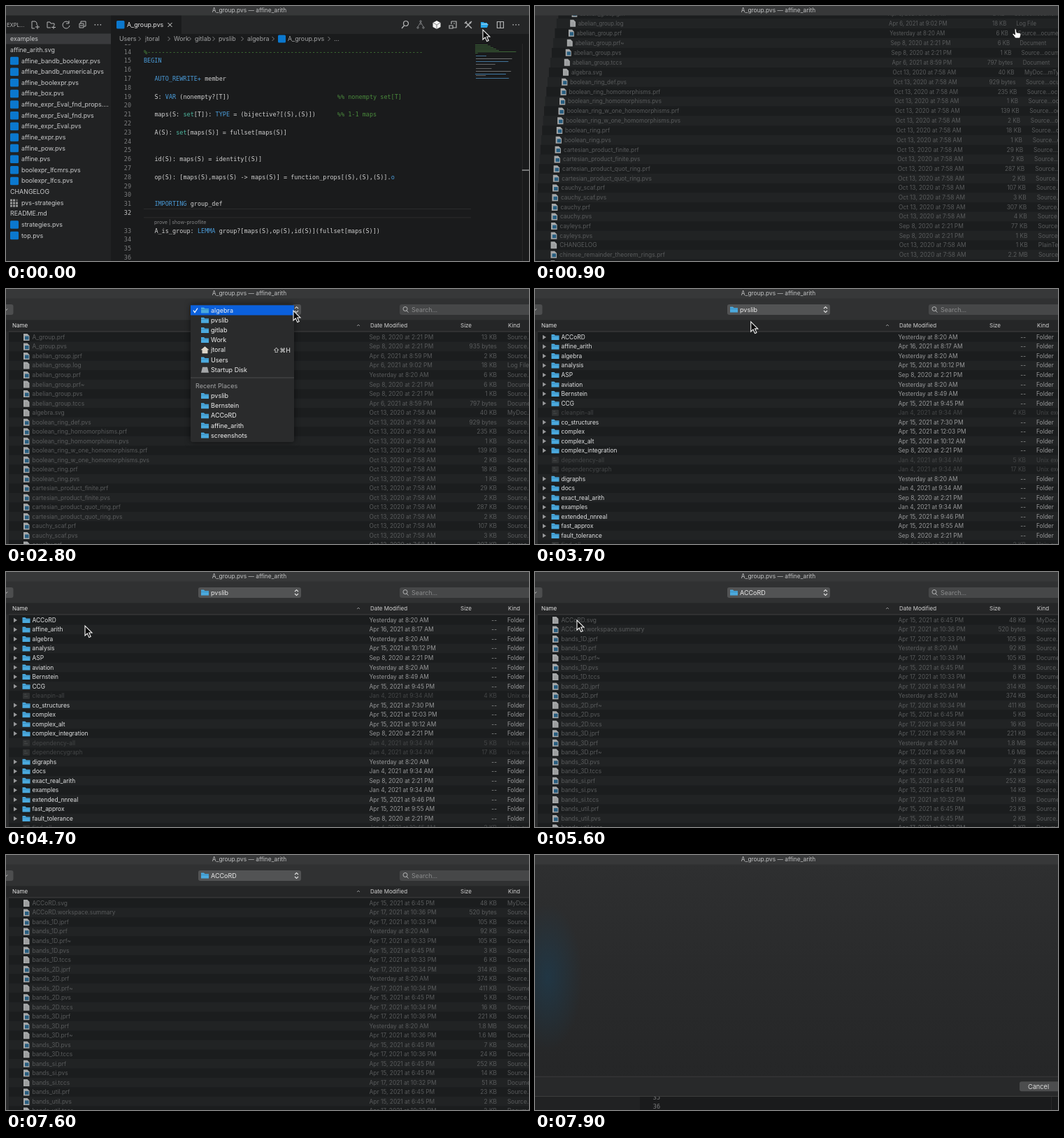
These frames come from a looping animation (748x365 px, 8000 ms). An HTML page with a canvas:

```html
<!DOCTYPE html>
<html>
<head>
<meta charset="utf-8">
<style>
html, body { margin: 0; width: 100%; height: 100%; overflow: hidden; background: #1a1b1c; }
canvas { display: block; }
</style>
</head>
<body>
<canvas id="stage" width="748" height="365"></canvas>
<script>
const LOOP = 8000, W = 748, H = 365, MID = 348, SHEET_END = 520;
const UI = 'Inter, "Open Sans", sans-serif', MONO = '"DejaVu Sans Mono", monospace';
const ctx = document.getElementById('stage').getContext('2d');

const clamp = (v, a = 0, b = 1) => Math.min(b, Math.max(a, v));
const smooth = p => p * p * (3 - 2 * p);

function rect(x, y, w, h, color, r = 0) {
  ctx.fillStyle = color;
  ctx.beginPath();
  ctx.roundRect(x, y, w, h, r);
  ctx.fill();
}
function text(s, x, y, color = '#ccc', size = 8.9, align = 'left', font = UI) {
  ctx.font = size + 'px ' + font;
  ctx.textAlign = align;
  ctx.textBaseline = 'middle';
  ctx.fillStyle = color;
  ctx.fillText(s, x, y + .4);
}
function shape(d, x, y, stroke, fill, width = 1) {
  const path = new Path2D(d);
  ctx.save();
  ctx.translate(x, y);
  if (fill) { ctx.fillStyle = fill; ctx.fill(path); }
  if (stroke) { ctx.strokeStyle = stroke; ctx.lineWidth = width; ctx.stroke(path); }
  ctx.restore();
}
function folder(x, y, color = '#4ba9dd') {
  shape('M0-4h4l1.5 1.5H11V4H0z', x, y, null, color);
  rect(x, y - 1.5, 11, .7, '#2f82b5');
}

// ---------- editor ----------
const tree = `examples
affine_arith.svg
affine_bandb_boolexpr.pvs
affine_bandb_numerical.pvs
affine_boolexpr.pvs
affine_box.pvs
affine_expr_Eval_fnd_props....
affine_expr_Eval_fnd.pvs
affine_expr_Eval.pvs
affine_expr.pvs
affine_pow.pvs
affine.pvs
boolexpr_lfcmrs.pvs
boolexpr_lfcs.pvs
CHANGELOG
pvs-strategies
README.md
strategies.pvs
top.pvs`.split('\n');

const code = {
  14: '%' + '-'.repeat(77),
  15: 'BEGIN',
  17: '   AUTO_REWRITE+ member',
  19: '   S: VAR (nonempty?[T])' + ' '.repeat(30) + '%% nonempty set[T]',
  21: '   maps(S: set[T]): TYPE = (bijective?[(S),(S)])' + ' '.repeat(6) + '%% 1-1 maps',
  23: '   A(S): set[maps(S)] = fullset[maps(S)]',
  26: '   id(S): maps(S) = identity[(S)]',
  28: '   op(S): [maps(S),maps(S) -> maps(S)] = function_props[(S),(S),(S)].o',
  31: '   IMPORTING group_def',
  33: '   A_is_group: LEMMA group?[maps(S),op(S),id(S)](fullset[maps(S)])'
};
const tokens = /%.*|\b(?:BEGIN|AUTO_REWRITE\+|VAR|TYPE|IMPORTING|LEMMA|set|o\b(?!p))|[^%\s]+?(?=\b(?:set\b|VAR|TYPE|o$)|\s|%|$)/g;
function tokenColor(s) {
  if (s[0] === '%') return '#4a8a3c';
  if (s === 'set') return '#4fb8a0';
  return /^([A-Z_]{3,}\+?|o)$/.test(s) ? '#4a9bd8' : '#cfcfcf';
}

function editor() {
  const grey = '#b4b5b6';
  rect(0, 0, W, H, '#1a1b1c');
  rect(0, 13, 150, H, '#212223');
  rect(150, 13, W, 27, '#252627');
  rect(150, 13, 101, 27, '#1a1b1c');

  // code
  for (let n = 13; n <= 36; n++) {
    const y = 66 + (n - (n > 32 ? 13 : 14)) * 12.8;
    if (n === 32) {
      rect(197, y - 6.5, 468, .8, '#303132');
      rect(197, y + 6, 468, .8, '#303132');
    }
    text(n, 179, y, n === 32 ? '#c6c6c6' : '#7c7d7e', 8.5, 'right', MONO);
    for (const m of (code[n] || '').matchAll(tokens))
      text(m[0], 197 + m.index * 5.127, y, tokenColor(m[0]), 8.515, 'left', MONO);
  }
  text('prove | show-prooflite', 212, 309.5, '#858687', 7.1);
  rect(150, 40, W, 14.5, '#1a1b1c');

  // minimap
  for (let n = 0; n < 26; n++) {
    const line = code[n + 9];
    if (line || n < 7) {
      const len = line ? line.trim().length * .75 : 18 + n * 37 % 33;
      rect(n < 7 ? 671 : 672, 55 + n * 2, Math.min(len, 62), .9,
        n < 7 ? '#3d6638' : n % 4 ? '#6d6e6f' : '#42749a');
    }
  }
  rect(671, 97, 44, 1, '#3d78a5');
  rect(738, 54, 1, H, '#29292a');
  rect(738, 234, 10, 2, '#737475');

  // sidebar
  text('EXPL...', 1, 27, '#b5b5b5', 7.6);
  shape('M-4-5h5l2 2v3M-4-5V5h4M4 0v6M1 3h6', 41, 27, grey);
  shape('M-5-4h4l1 2h5v3M-5-4V4h5M4 1v5M1 3.5h6', 64, 27, grey);
  shape('M4-3A5 5 0 1 0 5 1M4-6v4H0', 86, 27, grey);
  shape('M-4-2h6v6h-6zM-2-2v-3h7v7H2M-3 1h4', 109, 27, grey);
  for (const dx of [-4, 0, 4]) rect(130.5 + dx, 26, 1.7, 1.7, grey, 1);
  rect(0, 39.5, 150, 15, '#393a3c');
  tree.forEach((name, i) => {
    const y = 47.3 + i * 15.62, icon = /pvs|\.\.\.\.$/.test(name);
    if (name === 'pvs-strategies') {
      for (let k = 0; k < 9; k++) rect(6 + k % 3 * 4, y - 5 + (k / 3 | 0) * 4, 3, 3, k === 2 ? '#555' : '#999');
    } else if (icon) rect(6, y - 5.7, 12, 11.5, '#0b78ce', 1.5);
    text(name, icon ? 22 : 6, y, '#cbcccd');
  });

  // tab, toolbar and breadcrumbs
  rect(158, 21, 11.5, 11.5, '#0b78ce', 1.5);
  text('A_group.pvs', 173, 27, '#e6e6e6');
  shape('M-3-3L3 3M3-3L-3 3', 234.5, 27, '#ddd');
  shape('M4.5-2A3.5 3.5 0 1 1-2.5-2A3.5 3.5 0 1 1 4.5-2M-1.5 1L-5 5', 571, 27, grey, null, 1.2);
  shape('M-4 3L0-4L4 3M0-4V0M-5 3h2v2h-2zM3 3h2v2H3zM-1-6h2v2h-2z', 593, 27, '#77787a');
  shape('M0-6L5.5-3V3L0 6L-5.5 3V-3z', 616, 27, null, '#f2f2f2');
  shape('M-5-3L0 0L5-3M0 0V6', 616, 27, '#555', null, .7);
  shape('M-2-5h7v9H0M-2-5v4M-5 1h5v4h-5zM1-2h2', 639, 27, grey, null, 1.2);
  shape('M-4-4L5 5M5-5L-4 4M-5-2l3-3M2-4l2 2', 661, 27, grey, null, 1.5);
  shape('M-5-4h4l1 1h4v2h2L4 4h-9z', 684, 27, null, '#27a5e8');
  shape('M-4-1h9', 684, 27, '#bfe6fa');
  shape('M-4.5-4.5h9v9h-9zM0-4.5v9', 707, 27, grey, null, 1.2);
  for (const dx of [-4, 0, 4]) rect(728.5 + dx, 26, 1.7, 1.7, grey, 1);

  const crumbs = [['Users', 162], ['jtoral', 199], ['Work', 240], ['gitlab', 270], ['pvslib', 304], ['algebra', 345]];
  for (const [name, x] of crumbs) text(name, x, 47, '#a2a3a4');
  for (const x of [191, 233, 263, 297, 338, 382, 462]) shape('M-1.5-3L1.5 0L-1.5 3', x, 47, '#8b8c8d', null, .9);
  rect(389, 41.5, 11, 11, '#0b78ce', 1.5);
  text('A_group.pvs', 403, 47, '#a2a3a4');
  text('...', 469, 47, '#a2a3a4');
}

// ---------- file lists: name;day + time;size ----------
const days = {
  Y: 'Yesterday', O: 'Oct 13, 2020', S: 'Sep 8, 2020', A: 'Apr 15, 2021',
  B: 'Apr 17, 2021', C: 'Apr 6, 2021', D: 'Apr 16, 2021', J: 'Jan 4, 2021'
};
function kindOf(name, size) {
  if (size === '--') return 'Folder';
  if (/~$|tccs$/.test(name)) return 'Document';
  if (/svg$/.test(name)) return 'MyDoc...mType';
  if (/log$/.test(name)) return 'Log File';
  if (/\./.test(name)) return 'Source...ocument';
  return name === 'CHANGELOG' ? 'PlainText' : 'Unix executable';
}
const parse = s => s.trim().split('\n').map(line => {
  const [name, when = 'O', size = '--'] = line.split(';');
  return { name, size, kind: kindOf(name, size), date: days[when[0]] + ' at ' + (when.slice(1) || '7:58 AM') };
});
const lists = {
  algebra: parse(`
A_group.prf;S2:21 PM;13 KB
A_group.pvs;S2:21 PM;935 bytes
abelian_group.jprf;C8:59 PM;2 KB
abelian_group.log;C9:02 PM;18 KB
abelian_group.prf;Y8:20 AM;6 KB
abelian_group.prf~;S2:21 PM;6 KB
abelian_group.pvs;S2:21 PM;1 KB
abelian_group.tccs;C8:59 PM;797 bytes
algebra.svg;O;40 KB
boolean_ring_def.pvs;O;929 bytes
boolean_ring_homomorphisms.prf;O;235 KB
boolean_ring_homomorphisms.pvs;O;1 KB
boolean_ring_w_one_homomorphisms.prf;O;139 KB
boolean_ring_w_one_homomorphisms.pvs;O;2 KB
boolean_ring.prf;O;18 KB
boolean_ring.pvs;O;1 KB
cartesian_product_finite.prf;O;29 KB
cartesian_product_finite.pvs;O;2 KB
cartesian_product_quot_ring.prf;O;287 KB
cartesian_product_quot_ring.pvs;O;2 KB
cauchy_scaf.prf;O;107 KB
cauchy_scaf.pvs;O;3 KB
cauchy.prf;O;307 KB
cauchy.pvs;O;4 KB
cayleys.prf;S2:21 PM;77 KB
cayleys.pvs;S2:21 PM;1 KB
CHANGELOG;O;1 KB
chinese_remainder_theorem_rings.prf;O;2.2 MB
chinese_remainder_theorem_rings.pvs;O;9 KB`),
  pvslib: parse(`
ACCoRD;Y8:20 AM
affine_arith;D8:17 AM
algebra;Y8:20 AM
analysis;A10:12 PM
ASP;S2:21 PM
aviation;Y8:20 AM
Bernstein;Y8:49 AM
CCG;A9:45 PM
cleanpin-all;J9:34 AM;4 KB
co_structures;A7:30 PM
complex;A12:03 PM
complex_alt;A10:12 AM
complex_integration;S2:21 PM
dependency-all;J9:34 AM;5 KB
dependencygraph;J9:34 AM;17 KB
digraphs;Y8:20 AM
docs;J9:34 AM
exact_real_arith;S2:21 PM
examples;J9:34 AM
extended_nnreal;A9:46 PM
fast_approx;A9:55 AM
fault_tolerance;S2:21 PM
find-all;J10:45 AM;2 KB`),
  ACCoRD: parse(`
ACCoRD.svg;A6:45 PM;48 KB
ACCoRD.workspace.summary;B10:36 PM;520 bytes
bands_1D.jprf;B10:33 PM;105 KB
bands_1D.prf;Y8:20 AM;92 KB
bands_1D.prf~;B10:33 PM;105 KB
bands_1D.pvs;A6:45 PM;3 KB
bands_1D.tccs;B10:33 PM;6 KB
bands_2D.jprf;B10:34 PM;314 KB
bands_2D.prf;Y8:20 AM;374 KB
bands_2D.prf~;B10:34 PM;411 KB
bands_2D.pvs;A6:45 PM;5 KB
bands_2D.tccs;B10:34 PM;16 KB
bands_3D.jprf;B10:36 PM;221 KB
bands_3D.prf;Y8:20 AM;1.8 MB
bands_3D.prf~;B10:36 PM;1.6 MB
bands_3D.pvs;A6:45 PM;7 KB
bands_3D.tccs;B10:36 PM;24 KB
bands_si.prf;A6:45 PM;252 KB
bands_si.pvs;A6:45 PM;14 KB
bands_si.tccs;B10:32 PM;51 KB
bands_util.prf;A6:45 PM;23 KB
bands_util.pvs;A6:45 PM;2 KB
bands_util.tccs;B10:32 PM;3 KB`)
};

// ---------- sheet ----------
function fileRow(item, selected) {
  const open = item.size === '--', dim = '#595b5c';
  const unix = /^Unix/.test(item.kind), faint = unix ? '#444647' : dim;
  const info = selected ? '#fff' : open ? '#98999a' : faint;
  if (open) {
    shape('M0-3.2L5 0L0 3.2z', 11, 0, null, selected ? '#fff' : '#97989a');
    folder(23.5, 0);
  } else if (unix) {
    rect(24, -4.5, 10, 9, '#303233', 1);
    shape('M2-2h3M2 1h5', 24, 0, '#47494a');
  } else {
    shape('M0-5h5.5l3 3V5H0z', 25, 0, null, '#a6a8a9');
    if (/^Source/.test(item.kind)) rect(27, -1.5, 5.5, 5, '#285e80');
    else shape('M2-1h4.5M2 1h4.5M2 3h4.5', 25, 0, '#858788', null, .6);
  }
  text(item.name, 37.5, 0, open ? '#e2e3e4' : faint, 8.4);
  text(item.date, 519.5, 0, info, 8.4);
  text(item.size, 702, 0, info, 8.4, 'right');
  text(item.kind, 717, 0, info, 8.4);
}

function sheet(place, offset, blank, selected) {
  const bend = blank ? 0 : clamp(-offset / 79, 0, 1.2);
  const curve = y => clamp(1 - y / H, 0, 1.3) ** 2;
  const mapY = y => y + offset - bend * 7.9 * curve(y + offset);
  const at = (y, draw) => {
    const yy = mapY(y);
    if (yy < -40 || yy > H + 30) return;
    ctx.save();
    ctx.translate(MID, yy);
    ctx.scale(1 + bend * (.008 - .1 * curve(yy)), 1);
    ctx.translate(-MID, 0);
    draw();
    ctx.restore();
  };

  ctx.save();
  ctx.beginPath();
  ctx.rect(0, 13, W, H);
  ctx.clip();
  rect(0, 13, W, SHEET_END + offset - 13, '#2b2c2d');
  if (blank) {
    const shade = ctx.createLinearGradient(0, 13, 0, 330);
    shade.addColorStop(0, '#2e2f30');
    shade.addColorStop(1, '#252627');
    rect(0, 13, W, SHEET_END + offset - 13, shade);
    const glow = ctx.createRadialGradient(0, 0, 0, 0, 0, 100);
    glow.addColorStop(0, 'rgba(20,72,105,.4)');
    glow.addColorStop(1, 'rgba(20,72,105,0)');
    ctx.save();
    ctx.translate(18, 175);
    ctx.scale(.5, 1.05);
    rect(-100, -100, 200, 200, glow);
    ctx.restore();
  } else {
    for (let i = 0; i < 31; i++) {
      const item = lists[place][i], on = i === selected;
      at(69 + i * 13.52, () => {
        rect(4, -6.9, 900, 14.3, on ? '#0b58c8' : i % 2 ? '#212324' : '#1b1d1e');
        if (item) fileRow(item, on);
      });
    }
    at(29.5, () => {
      rect(-60, -17, 900, 32, '#303132');
      rect(-20, -7.5, 30.5, 15, '#4d4e4f', 3);
      shape('M-2-1L0 1L2-1', 0, 0, '#ccc');
      rect(275, -7.5, 147, 15, '#525354', 3);
      folder(279, 0);
      text(place, 293, 0, '#e8e8e8', 9);
      shape('M-2.5-1.5L0-4L2.5-1.5M-2.5 1.5L0 4L2.5 1.5', 415.5, 0, '#e0e0e0', null, 1.1);
      rect(563, -7.5, 260, 15, '#464748', 3);
      shape('M3-1A3 3 0 1 1-3-1A3 3 0 1 1 3-1M2 1.5L4.5 4', 571, 0, '#b5b6b7');
      text('Search...', 580, 0, '#8a8b8c', 8.9);
    });
    at(52, () => {
      rect(-60, -7.5, 900, 16, '#252627');
      rect(4, 8, 900, .8, '#38393a');
      text('Name', 9, 0, '#e5e5e5', 8);
      shape('M-2 1L0-1L2 1', 504, 0, '#aaa', null, .8);
      text('Date Modified', 521, 0, '#d2d2d2', 8);
      text('Size', 650, 0, '#d2d2d2', 8);
      text('Kind', 718, 0, '#d2d2d2', 8);
    });
  }
  at(SHEET_END - 29, () => {
    rect(-60, 0, 900, 29, '#28292a');
    rect(-60, 0, 900, .8, '#393a3b');
    rect(693, 7.5, 70, 14, '#4c4d4e', 3);
    text('Cancel', 705, 14.5, '#dcdcdc', 9.2);
    rect(-60, 28.2, 900, .8, '#434445');
  });
  ctx.restore();
}

// ---------- location menu ----------
const places = ['algebra', 'pvslib', 'gitlab', 'Work', 'jtoral', 'Users', 'Startup Disk'];
const recent = ['pvslib', 'Bernstein', 'ACCoRD', 'affine_arith', 'screenshots'];
function menu(hoverY) {
  const hover = clamp(Math.floor((hoverY - 23) / 14.2), 0, 6);
  ctx.save();
  ctx.shadowColor = '#0008';
  ctx.shadowBlur = 8;
  rect(264, 22, 148, 197, '#2a2b2c', 3);
  ctx.restore();
  rect(264, 23.2 + hover * 14.2, 148, 14.4, '#0b60dc');
  places.forEach((name, i) => {
    const y = 30.5 + i * 14.2;
    if (i === 4) shape('M-1 0L5-5L11 0H9V5H1V0z', 279.5, y, null, '#ddd5c8');
    else if (i === 6) shape('M2-4h7l2 8H0z', 279, y, null, '#a5a7a9');
    else folder(279, y);
    text(name, 293, y, '#f0f0f0', 9);
  });
  shape('M-3 0L-1 3L3-3', 271, 30.5, '#fff', null, 1.3);
  text('⇧⌘H', 407, 87.5, '#ececec', 9, 'right', 'Inter, "DejaVu Sans", sans-serif');
  rect(264, 126.5, 148, 1, '#4b4c4d');
  text('Recent Places', 271, 138.5, '#a5a6a7', 9);
  recent.forEach((name, i) => {
    folder(279, 153 + i * 14.15);
    text(name, 293, 153 + i * 14.15, '#f0f0f0', 9);
  });
}

// ---------- pointer: time, x, y ----------
const pointerPath = [
  [0, 682, 34], [300, 687, 33], [1000, 687, 33], [1400, 600, 36], [1550, 600, 36], [1800, 457, 33],
  [2350, 411, 31], [2850, 411, 31], [3300, 318, 45], [3600, 318, 45], [4250, 175, 74],
  [4700, 113, 77], [5100, 60, 69], [6200, 60, 69], [6600, 640, 400], [LOOP, 640, 400]
];
function pointerAt(t) {
  const i = pointerPath.findIndex(p => p[0] > t);
  const [t0, x0, y0] = pointerPath[i - 1], [t1, x1, y1] = pointerPath[i];
  const p = smooth((t - t0) / (t1 - t0));
  return [x0 + (x1 - x0) * p, y0 + (y1 - y0) * p];
}
function pointer(x, y, hand) {
  if (hand) shape('M-1 0Q0-1 1 0L2 5L6 5.5Q8 6 8 8L6.5 13H0L-4 7.5Q-4 6-2.5 6.5L-.5 8z', x, y, '#111', '#fff', .8);
  else shape('M0 0V14L3.3 11L5.8 16.6L8.2 15.5L5.7 10H10z', x, y, '#f4f4f4', '#080808', 1.1);
}

function draw(t) {
  const [x, y] = pointerAt(t);
  const closing = t >= 7700;
  editor();
  if (t >= 700) {
    const opening = 1 - clamp((t - 700) / 400);
    const offset = closing ? -173 * ((t - 7600) / 300) ** 2
      : t < 900 ? -SHEET_END + (SHEET_END - 79) * (t - 700) / 200
      : -79 * (opening * 2) ** 2;
    const place = t < 3600 ? 'algebra' : t < 5500 ? 'pvslib' : 'ACCoRD';
    sheet(place, offset, closing, t >= 5200 && t < 5500 ? 0 : -1);
  }
  if (t >= 2500 && t < 3500) menu(y);
  rect(0, 0, W, 13.5, '#373839');
  text('A_group.pvs — affine_arith', MID, 6.3, '#c2c3c4', 8.4, 'center');
  pointer(x, y, t >= 200 && t < 1000);
}

function tick(now) {
  draw(now % LOOP);
  requestAnimationFrame(tick);
}
requestAnimationFrame(tick);
</script>
</body>
</html>
```
